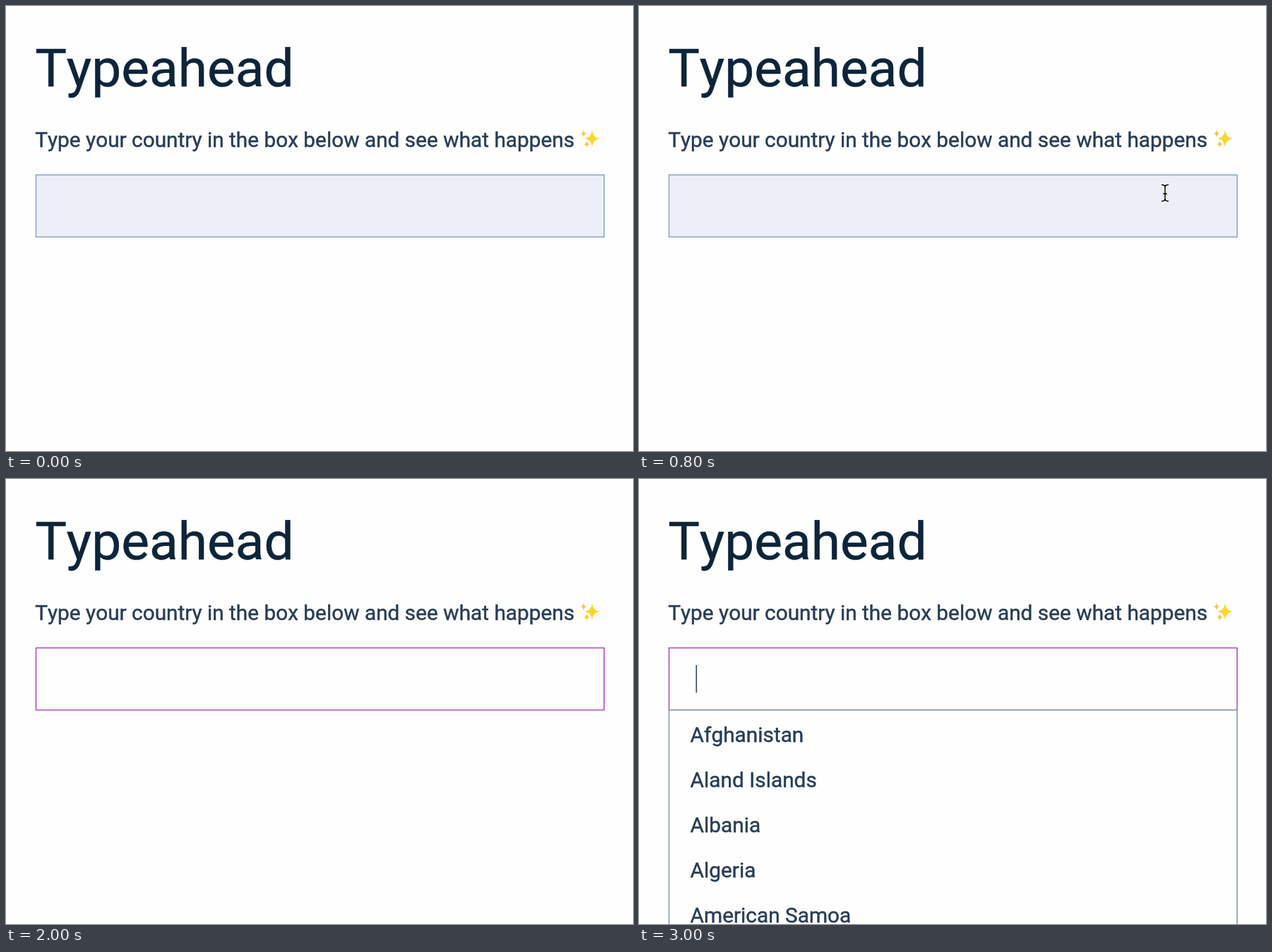
Animation, 888 px wide and 631 px high, one loop 3070 ms. Source, as an HTML page:

```html
<!DOCTYPE html>
<html lang="en">
<head>
<meta charset="utf-8">
<title>Typeahead</title>
<style>
  html, body { margin: 0; width: 100%; height: 100%; overflow: hidden; background: #fefefe; }
  svg { display: block; width: 100%; height: 100%; font-family: Roboto, sans-serif; font-kerning: none; }
  .title { font-size: 74.9px; fill: #0d243b; stroke: #0d243b; stroke-width: 0.5; }
  .copy { font-size: 29.82px; fill: #293d57; stroke: #293d57; stroke-width: 0.45; }
  .line { fill: none; stroke: #86a3bf; stroke-width: 1.7; }
</style>
</head>
<body>
<svg viewBox="0 0 888 631">
  <rect width="888" height="631" fill="#fefefe"/>
  <text class="title" x="41.2" y="114">Typeahead</text>
  <text class="copy" x="41.2" y="200">Type your country in the box below and see what happens</text>
  <g id="sparkles"></g>
  <rect id="field" x="42.5" y="239.5" width="804.6" height="88" stroke-width="1.5"/>
  <g id="list">
    <path class="line" d="M42.5 640V327.5H847.1V640"/>
  </g>
  <rect id="caret" y="264" width="1.6" height="39" fill="#33475f"/>
  <circle id="ring" cx="744.7" cy="265" r="24.7" fill="#fefefe" stroke="#000" stroke-width="2.1"/>
  <g id="beam" fill="none" stroke-linecap="round">
    <path id="beamShape" d="M-4.6 -11.5Q0 -11.5 0 -8Q0 -11.5 4.6 -11.5M0 -8V8M-4.6 11.8Q0 11.8 0 8Q0 11.8 4.6 11.8M-2.4 1.2H2.4"/>
  </g>
  <path id="arrow" d="M0 0V23L5.2 18L8.8 26.5L12.6 25L9 16.6H16.4Z" fill="#000" stroke="#fff" stroke-width="1.5"/>
</svg>
<script>
const LOOP = 3070, TICK = 200 / 3;
const NS = "http://www.w3.org/2000/svg";
const $ = id => document.getElementById(id);

function add(parent, tag, attrs, text) {
  const el = document.createElementNS(NS, tag);
  for (const key in attrs) el.setAttribute(key, attrs[key]);
  if (text) el.textContent = text;
  parent.appendChild(el);
  return el;
}

function star(x, y, rx, ry, fill) {
  const a = rx * 0.06, b = ry * 0.06;
  const d = `M0 ${-ry}Q${a} ${-b} ${rx} 0Q${a} ${b} 0 ${ry}Q${-a} ${b} ${-rx} 0Q${-a} ${-b} 0 ${-ry}Z`;
  add($("sparkles"), "path", { d, fill, transform: `translate(${x} ${y})` });
}

star(830, 188, 11.5, 13.5, "#fdd52b");
star(818, 181, 4.5, 6, "#f9c440");
star(822.5, 196, 4.5, 6, "#f9c440");

["Afghanistan", "Aland Islands", "Albania", "Algeria", "American Samoa"].forEach((name, i) =>
  add($("list"), "text", { class: "copy", x: 72.6, y: 373 + 64.1 * i }, name));

// White halo below the black stroke
for (const [stroke, width] of [["#fff", 3.6], ["#000", 1.5]]) {
  const shape = $("beamShape").cloneNode();
  shape.removeAttribute("id");
  shape.setAttribute("stroke", stroke);
  shape.setAttribute("stroke-width", width);
  $("beam").appendChild(shape);
}
$("beamShape").remove();

const show = (id, on) => $(id).setAttribute("visibility", on ? "visible" : "hidden");
const between = (t, a, b) => t >= a && t < b;

function draw(t) {
  const focused = t >= 1130, typed = t >= 2070;
  $("field").setAttribute("fill", focused ? "#fefefe" : "#eceff8");
  $("field").setAttribute("stroke", focused ? "#ad45bd" : "#86a3bf");
  show("list", typed);
  show("ring", between(t, 1130, 1200));

  $("caret").setAttribute("x", typed ? 80.5 : 73.1);
  show("caret", between(t, 1130, 1670) || between(t, 2070, 2530) || t >= 3000);

  // The pointer is sampled 15 times a second
  const step = Math.floor((t + 5) / TICK);
  const rest = 1 - Math.min(1, Math.max(0, (step - 7) / 5));
  const x = 745 + 135 * rest * rest, y = 265 - 3 * rest;
  const visible = between(t, 470, 2000), inside = x < 848;
  show("beam", visible && inside);
  show("arrow", visible && !inside);
  for (const id of ["beam", "arrow"]) $(id).setAttribute("transform", `translate(${x} ${y})`);
}

const start = performance.now();
function frame() {
  draw((performance.now() - start) % LOOP);
  requestAnimationFrame(frame);
}
frame();
</script>
</body>
</html>
```
